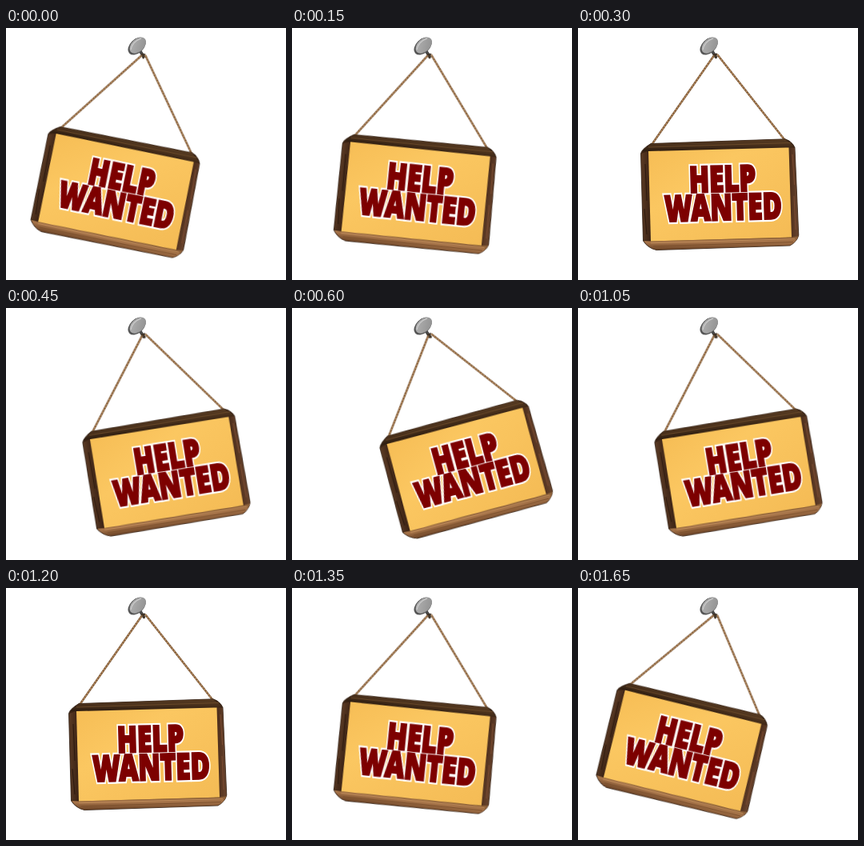
Animation, 350 px wide and 315 px high, one loop 1800 ms. Source, as an HTML page:

```html
<!DOCTYPE html>
<html lang="en">
<head>
<meta charset="utf-8">
<title>Swinging sign</title>
<style>
  html, body { margin: 0; width: 100%; height: 100%; overflow: hidden; background: #fff; }
  svg { display: block; width: 350px; height: 315px; }
  #sign { transform-origin: 171px 33px; }
  text {
    font: 800 45px "Open Sans", sans-serif;
    text-anchor: middle;
    fill: #7d0000;
    stroke-linejoin: miter;
    stroke-miterlimit: 3;
    vector-effect: non-scaling-stroke;
  }
  .halo { fill: #fff; stroke: #fff; stroke-width: 6; }
  .ink { stroke: #7d0000; stroke-width: 2.2; }
  .twine { fill: none; stroke: #75502f; stroke-width: 2.5; }
  .twist { fill: none; stroke: #c49a6c; stroke-width: 1.3; stroke-dasharray: 2.4 1.2; }
  .grain { fill: none; stroke-width: 1; }
</style>
</head>
<body>
<svg viewBox="0 0 350 315">
  <defs>
    <linearGradient id="panel" x1="0" y1="0" x2="1" y2="1">
      <stop offset="0" stop-color="#f6bd55"/>
      <stop offset=".35" stop-color="#fbc761"/>
      <stop offset="1" stop-color="#f4bb55"/>
    </linearGradient>
    <linearGradient id="top" x1="0" y1="0" x2="0" y2="1">
      <stop offset="0" stop-color="#573b22"/>
      <stop offset=".5" stop-color="#49301b"/>
      <stop offset="1" stop-color="#2c1c10"/>
    </linearGradient>
    <linearGradient id="left" x1="0" y1="0" x2="1" y2="0">
      <stop offset="0" stop-color="#5a3a24"/>
      <stop offset="1" stop-color="#3a2214"/>
    </linearGradient>
    <linearGradient id="right" x1="0" y1="0" x2="1" y2="0">
      <stop offset="0" stop-color="#4a2c1a"/>
      <stop offset="1" stop-color="#6a452e"/>
    </linearGradient>
    <linearGradient id="bottom" x1="0" y1="0" x2=".06" y2="1">
      <stop offset="0" stop-color="#7c532f"/>
      <stop offset=".45" stop-color="#a8754a"/>
      <stop offset="1" stop-color="#6a4225"/>
    </linearGradient>
    <linearGradient id="steel" x1="0" y1="0" x2="1" y2="1">
      <stop offset="0" stop-color="#b4b4b4"/>
      <stop offset="1" stop-color="#8e8e8e"/>
    </linearGradient>
    <path id="rope" d="M93 144.5 L171 33 M174 33 L258.5 140"/>
  </defs>

  <g id="nail">
    <path d="M167 28 L173 37" stroke="#4a4a4a" stroke-width="4"/>
    <ellipse cx="163.6" cy="22.6" rx="13" ry="8.6" transform="rotate(-44 163.6 22.6)" fill="#555"/>
    <ellipse cx="164.8" cy="21.6" rx="12" ry="7.8" transform="rotate(-44 164.8 21.6)" fill="url(#steel)"/>
    <path d="M156 27 Q158 17 169 13" fill="none" stroke="#cfcfcf" stroke-width="1.2"/>
  </g>

  <g id="sign">
    <use href="#rope" class="twine"/>
    <use href="#rope" class="twist"/>
    <path d="M169 33.5 L174 32.5 M171 33 L173 38" fill="none" stroke="#3f3225" stroke-width="2.2"/>

    <path d="M78.5 157 Q79 152 91 144.5 L259 138.8 Q268 142 271 149.5 L275.8 259 Q274 267 265 272 L98 277.6 Q87 275 81.5 266Z"
          fill="#3b2414" stroke="#2b1a0e" stroke-width=".8"/>
    <path d="M80 154 L91 144.7 L259 139 L270 148 L263.5 149.5 L88 154Z" fill="url(#top)"/>
    <path d="M79 157 L88 154 L91 266.5 L82 265Z" fill="url(#left)"/>
    <path d="M263.5 149.5 L270.8 149.5 L275.5 260 L267 262Z" fill="url(#right)"/>
    <path d="M82 266 L91 266.5 L267 261.5 L275.5 260 Q273.5 267 265 271.8 L98 277.3 Q88 275 82 266Z" fill="url(#bottom)"/>
    <g class="grain">
      <path d="M88 149 L266 143.5" stroke="#694929"/>
      <path d="M84 170 L86 216 M83 226 L86 258" stroke="#2c190e"/>
      <path d="M268 158 L270.5 196 M270 210 L272 252" stroke="#7c4b31"/>
      <path d="M91 268.8 L271 263.6" stroke="#bd8b5a"/>
      <path d="M94 272.8 L269 267.4" stroke="#7c512e"/>
    </g>
    <path d="M88 154 L263.5 149.5 L267 261.5 L91 266.5Z" fill="url(#panel)"/>

    <!-- Condensed poster lettering, centred on its own origin. -->
    <g id="words" transform="translate(181 206) rotate(-1.6) scale(.735 1)"></g>
  </g>
</svg>
<script>
  const SVG = "http://www.w3.org/2000/svg";
  const words = document.getElementById("words");
  const lines = [["HELP", -1.5], ["WANTED", 34]];

  // White halos go below all the red letters.
  for (const layer of ["halo", "ink"]) {
    for (const [word, y] of lines) {
      const text = document.createElementNS(SVG, "text");
      text.setAttribute("class", layer);
      text.setAttribute("y", y);
      text.textContent = word;
      words.append(text);
    }
  }

  // Half a swing from left to right, in degrees from rest.
  const swing = [15.4, 13.1, 7.4, 0, -7.7, -13.5, -15.6];
  const order = [1, 2, 3, 4, 5, 6, 5, 4, 3, 2, 1, 0];
  const steps = [...order, order[0]].map((pose, i) => ({
    offset: i / order.length,
    transform: `rotate(${swing[pose]}deg)`,
    easing: "steps(1, end)"
  }));
  document.getElementById("sign").animate(steps, { duration: 1800, iterations: Infinity });
</script>
</body>
</html>
```
